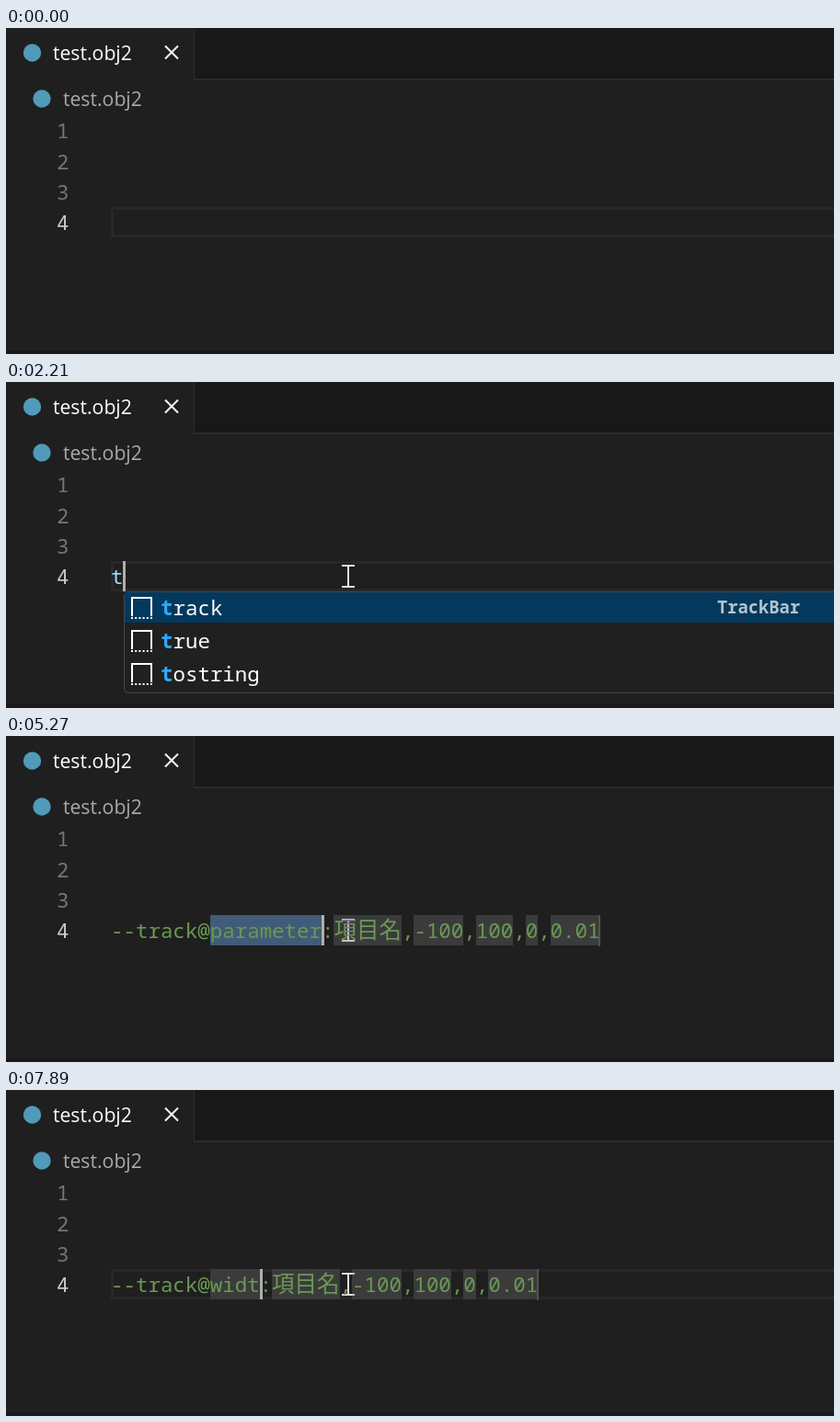
An HTML page with a canvas for the animation above (8000 ms loop, 900 by 355 pixels).

```html
<!DOCTYPE html>
<html lang="en">
<head>
<meta charset="utf-8">
<title>Snippet completion</title>
<style>
  html, body { margin: 0; width: 100%; height: 100%; overflow: hidden; background: #1f1f1f; }
  canvas { display: block; width: 900px; height: 355px; }
</style>
</head>
<body>
<canvas id="stage" width="900" height="355"></canvas>
<script>
const ctx = document.getElementById('stage').getContext('2d');
const LOOP = 8000;
const CELL = 13.47;
const LEFT = 114, TOP = 195, LINE = 33;
const MONO_SIZE = CELL / 0.6;
const mono = (size = MONO_SIZE, weight = 400) =>
  `${weight} ${size}px "Noto Sans Mono", "DejaVu Sans Mono", monospace`;
const UI = '21.2px "Open Sans", "Noto Sans", sans-serif';
const CJK = '24.5px "Noto Sans CJK JP", "Noto Sans CJK", sans-serif';

// [start time, text]
const TYPED = [[0, ''], [2210, 't'], [2620, 'tr'], [2890, 'tra'], [3700, 'trac'], [3900, 'track']];
const NAMES = [[5270, 'parameter'], [6660, ''], [7160, 'w'], [7290, 'wi'], [7560, 'wid'], [7890, 'widt']];
const CARET = [[0, false], [750, true], [1220, false], [1750, true], [3350, false], [3700, true],
  [4360, false], [4890, true], [5020, false], [5270, true], [5730, false], [6260, true]];
const POINTER = [[70, 0], [140, 0.4], [210, 0.85], [280, 1]];
const ITEMS = ['track', 'true', 'tostring'];

function at(steps, t) {
  let value;
  for (const [start, v] of steps) if (t >= start) value = v;
  return value;
}

function rect(x, y, w, h, color) {
  ctx.fillStyle = color;
  ctx.fillRect(x, y, w, h);
}

function disc(x, y, r, color) {
  ctx.fillStyle = color;
  ctx.beginPath();
  ctx.arc(x, y, r, 0, Math.PI * 2);
  ctx.fill();
}

function label(text, x, y, color, font) {
  ctx.font = font;
  ctx.fillStyle = color;
  ctx.fillText(text, x, y);
}

const isWide = ch => ch > '\u2e7f';
const widthOf = text => [...text].reduce((sum, ch) => sum + (isWide(ch) ? 24.5 : CELL), 0);

function code(text, x, y, color) {
  for (const ch of text) {
    label(ch, x, y, color, isWide(ch) ? CJK : mono());
    x += widthOf(ch);
  }
}

function drawFrame(showLine) {
  rect(0, 0, 900, 355, '#1f1f1f');
  rect(205, 0, 695, 55, '#181818');
  rect(204, 0, 1, 57, '#2b2b2b');
  rect(204, 55, 696, 2, '#2b2b2b');
  rect(0, 351, 900, 4, '#1b1719');

  disc(28.5, 27, 9.7, '#519aba');
  disc(39, 77, 9.7, '#519aba');
  label('test.obj2', 51, 35, '#ffffff', UI);
  label('test.obj2', 62, 85, '#a9a9a9', UI);

  ctx.strokeStyle = '#ffffff';
  ctx.lineWidth = 2;
  ctx.beginPath();
  ctx.moveTo(173, 19.5); ctx.lineTo(187, 33.5);
  ctx.moveTo(187, 19.5); ctx.lineTo(173, 33.5);
  ctx.stroke();

  for (let n = 1; n <= 4; n++) {
    const y = Math.round(220 - (4 - n) * 33.25);
    label(n, 55, y, n === 4 ? '#cccccc' : '#6e7681', mono());
  }
  if (showLine) {
    ctx.strokeStyle = '#282828';
    ctx.lineWidth = 3;
    ctx.strokeRect(LEFT + 1.5, TOP + 1.5, 800, LINE - 3);
  }
}

function drawIcon(x, y) {
  ctx.strokeStyle = '#ffffff';
  ctx.lineWidth = 2;
  ctx.beginPath();
  ctx.moveTo(x + 1, y + 21);
  ctx.lineTo(x + 1, y + 1);
  ctx.lineTo(x + 22, y + 1);
  ctx.lineTo(x + 22, y + 21);
  ctx.stroke();
  for (let i = 0; i < 6; i++) rect(x + i * 4.2, y + 22, 2, 2, '#ffffff');
}

function drawItem(item, query, x, y) {
  let hit = 0;
  [...item].forEach((ch, i) => {
    const match = ch === query[hit];
    if (match) hit++;
    label(ch, x + i * CELL, y, match ? '#2aaaff' : '#ffffff', mono(MONO_SIZE, match ? 700 : 400));
  });
}

function drawPopup(query) {
  const x = Math.round(LEFT + widthOf(query) + 0.2);
  const items = query.length < 3 ? ITEMS : ITEMS.slice(0, 1);
  const height = items.length * 36 + 3;
  ctx.beginPath();
  ctx.roundRect(x + 0.5, 228.5, 860, height - 1, 4);
  ctx.fillStyle = '#202020';
  ctx.fill();
  ctx.strokeStyle = '#454545';
  ctx.lineWidth = 1;
  ctx.stroke();
  rect(x + 1, 229, 858, 33, '#04395e');
  items.forEach((item, i) => {
    const y = i * 36;
    drawIcon(x + 8, 234 + y);
    drawItem(item, query, x + 40, 254 + y);
  });
  label('TrackBar', x + 645, 252, '#b4c4cf', mono(18.8, 600));
}

function drawSnippet(name) {
  const fields = [name, '項目名', '-100', '100', '0', '0.01'];
  const glue = ['--track@', ':', ',', ',', ',', ','];
  const color = '#6a9955';
  let x = LEFT, caret;
  fields.forEach((field, i) => {
    code(glue[i], x, 220, color);
    x += widthOf(glue[i]);
    const from = Math.round(x), w = widthOf(field);
    const selected = i === 0 && name === 'parameter';
    rect(from, TOP, Math.round(x + w) - from, LINE, selected ? '#405c79' : '#3b3b3b');
    code(field, x, 220, color);
    x += w;
    if (i === 0) caret = x;
  });
  rect(Math.round(x) - 1, TOP, 2, LINE + 1, '#525252');
  return caret;
}

function drawPointer(t) {
  const p = at(POINTER, t);
  if (p === undefined) return;
  const x = Math.round(695 - 323 * p), y = Math.round(282 - 83 * p);
  ctx.globalCompositeOperation = 'difference';
  rect(x - 7, y, 14, 2, '#ffffff');
  rect(x - 1, y + 2, 2, 21, '#ffffff');
  rect(x - 7, y + 23, 14, 2, '#ffffff');
  ctx.globalCompositeOperation = 'source-over';
}

function draw(t) {
  const name = at(NAMES, t);
  drawFrame(name !== 'parameter');
  let caret;
  if (name === undefined) {
    const typed = at(TYPED, t);
    code(typed, LEFT, 220, '#9cdcfe');
    if (typed) drawPopup(typed);
    caret = LEFT + widthOf(typed);
  } else {
    caret = drawSnippet(name);
  }
  if (at(CARET, t)) rect(Math.round(caret), TOP, 3, LINE, '#aeafad');
  drawPointer(t);
  if (t >= 680 && t < 830) disc(369, 210, 21, 'rgba(255, 255, 0, 0.47)');
}

const begin = performance.now();
function tick() {
  draw((performance.now() - begin) % LOOP);
  requestAnimationFrame(tick);
}
tick();
</script>
</body>
</html>
```
